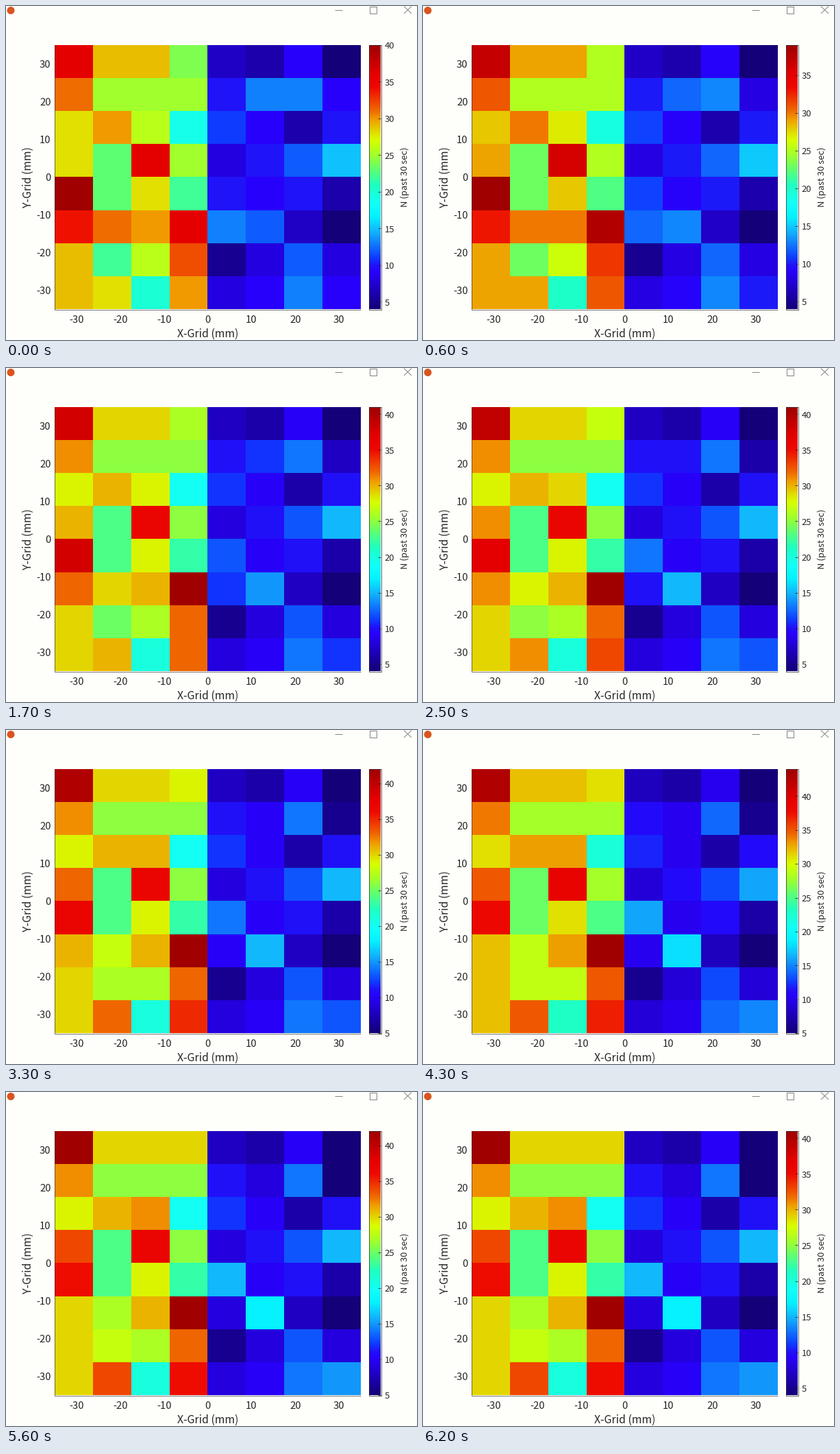
Animation, 600 px wide and 487 px high, one loop 6.3 s. Source, as a matplotlib script:

```python
import numpy as np
import matplotlib.pyplot as plt
from matplotlib.animation import FuncAnimation
from matplotlib.colors import LinearSegmentedColormap
from matplotlib.patches import Circle, Rectangle

W, H, DPI = 600, 487, 100
FRAMES, INTERVAL = 63, 100
LEFT, RIGHT, TOP, BOTTOM = 71, 518, 57, 442
BAR_LEFT, BAR_RIGHT = 530, 547
INK, GREY, PAPER = "#262626", "#858585", "#fefefb"
CAP = 0.733  # digit height as a share of the font size

plt.rcParams["font.family"] = "Noto Sans CJK JP"

# Jet-like scale: position, then red, green, blue
STOPS = [
    (0, 20, 0, 120), (0.14, 40, 0, 252), (0.165, 32, 18, 248),
    (0.194, 15, 60, 255), (0.295, 18, 182, 252), (0.35, 5, 242, 255),
    (0.4, 18, 255, 248), (0.47, 32, 255, 192), (0.53, 95, 255, 112),
    (0.583, 160, 255, 45), (0.64, 215, 255, 0), (0.667, 225, 225, 0),
    (0.722, 240, 155, 0), (0.75, 240, 110, 0), (0.84, 238, 10, 0),
    (0.89, 230, 0, 0), (1, 160, 0, 0),
]
cmap = LinearSegmentedColormap.from_list(
    "counts", [(t, (r / 255, g / 255, b / 255)) for t, r, g, b in STOPS], N=512)

# Opening counts on the sensor grid, top row first
START = np.array([
    (36, 29, 29, 24, 7, 6, 9, 4),
    (31, 25, 25, 25, 10, 13, 13, 9),
    (28, 30, 26, 19, 11, 9, 6, 10),
    (28, 23, 36, 25, 8, 10, 12, 15),
    (40, 23, 28, 22, 10, 9, 10, 6),
    (34, 31, 30, 36, 13, 12, 7, 4),
    (29, 22, 26, 32, 5, 8, 12, 8),
    (29, 28, 20, 30, 8, 9, 13, 9),
])

# Cells whose rate moves to a new level, as (row, column)
RISING = [(0, 0), (0, 3), (2, 2), (3, 0), (4, 4), (5, 5),
          (6, 1), (7, 1), (7, 3), (7, 7)]
FALLING = [(1, 5), (1, 7), (4, 0), (5, 0), (5, 1), (5, 4)]
EARLY = (5, 3)
SHIFT = 5


def counts(frame):
    """Steady drift of some cells under a swell, strongest on the left half."""
    drift = SHIFT * min(frame / 45, 1)
    swell = 2.7 * np.exp(-((frame - 45) / 13) ** 2)
    grid = START.astype(float)
    grid[tuple(zip(*RISING))] += drift
    grid[tuple(zip(*FALLING))] -= drift
    grid[EARLY] += SHIFT * min(frame / 15, 1)
    grid[:, :4] += swell
    grid[:, 4:] += swell / 2
    return np.floor(grid + 0.5)


fig = plt.figure(figsize=(W / DPI, H / DPI), dpi=DPI, facecolor=PAPER)
ax = fig.add_axes([0, 0, 1, 1])


def px(size):
    return size * 72 / DPI


def line(xs, ys, color=INK, width=1.0):
    return ax.plot(xs, ys, color=color, lw=px(width), solid_capstyle="butt")[0]


def label(x, y, text, size, ha="center", rotation=0):
    """Text set on its baseline."""
    return ax.text(x, y, text, fontsize=px(size), color=INK, ha=ha, va="baseline",
                   rotation=rotation, rotation_mode="anchor")


# Heat map and colour bar
heat = ax.imshow(counts(0), cmap=cmap, interpolation="nearest",
                 extent=(LEFT, RIGHT, BOTTOM, TOP), aspect="auto")
ax.imshow(np.linspace(1, 0, BOTTOM - TOP)[:, None], cmap=cmap,
          interpolation="nearest", extent=(BAR_LEFT, BAR_RIGHT, BOTTOM, TOP),
          aspect="auto")
ax.add_patch(Rectangle((BAR_LEFT - 0.5, TOP - 0.5), BAR_RIGHT - BAR_LEFT + 1,
                       BOTTOM - TOP + 1, fill=False, ec=INK, lw=px(0.7)))
line([LEFT - 0.5, LEFT - 0.5, RIGHT], [TOP, BOTTOM + 0.5, BOTTOM + 0.5], width=0.6)

# Axis text
AXIS_SIZE, BAR_SIZE = 14.8, 13
axis_drop, bar_drop = AXIS_SIZE * CAP / 2, BAR_SIZE * CAP / 2
for v in range(-30, 31, 10):
    x = (LEFT + RIGHT) / 2 + v * (RIGHT - LEFT) / 70
    y = (TOP + BOTTOM) / 2 - v * (BOTTOM - TOP) / 70
    label(x, 457 + axis_drop, str(v), AXIS_SIZE)
    label(65.5, y + 0.5 + axis_drop, str(v), AXIS_SIZE, ha="right")
label(294.5, 483, "X-Grid (mm)", 15.8)
label(36.5, 250, "Y-Grid (mm)", 15.8, rotation=90)
label(586, 249.5, "N (past 30 sec)", BAR_SIZE, rotation=90)

bar_ticks = [(v, line([BAR_RIGHT - 4, BAR_RIGHT], [0, 0], width=0.8),
              label(552.5, 0, str(v), BAR_SIZE, ha="left"))
             for v in range(5, 50, 5)]

# Window icon and buttons
ax.add_patch(Circle((7, 6.5), 5.5, fc="#d9541e", ec="none"))
line([480, 491], [5.5, 5.5], GREY)
ax.add_patch(Rectangle((530.5, 0.5), 10, 10, fill=False, ec=GREY, lw=px(1)))
line([581, 592], [0.5, 11], GREY)
line([581, 592], [11, 0.5], GREY)

ax.set_xlim(0, W)
ax.set_ylim(H, 0)
ax.axis("off")


def draw(frame):
    grid = counts(frame)
    low, high = grid.min(), grid.max()
    heat.set_data(grid)
    heat.set_clim(low, high)
    for v, mark, text in bar_ticks:
        y = BOTTOM - (v - low) / (high - low) * (BOTTOM - TOP)
        shown = low <= v <= high
        mark.set_ydata([y, y])
        text.set_y(y + 0.5 + bar_drop)
        mark.set_visible(shown)
        text.set_visible(shown)
    return []


anim = FuncAnimation(fig, draw, frames=FRAMES, interval=INTERVAL,
                     repeat=True, repeat_delay=0, cache_frame_data=False)
plt.show()
```
